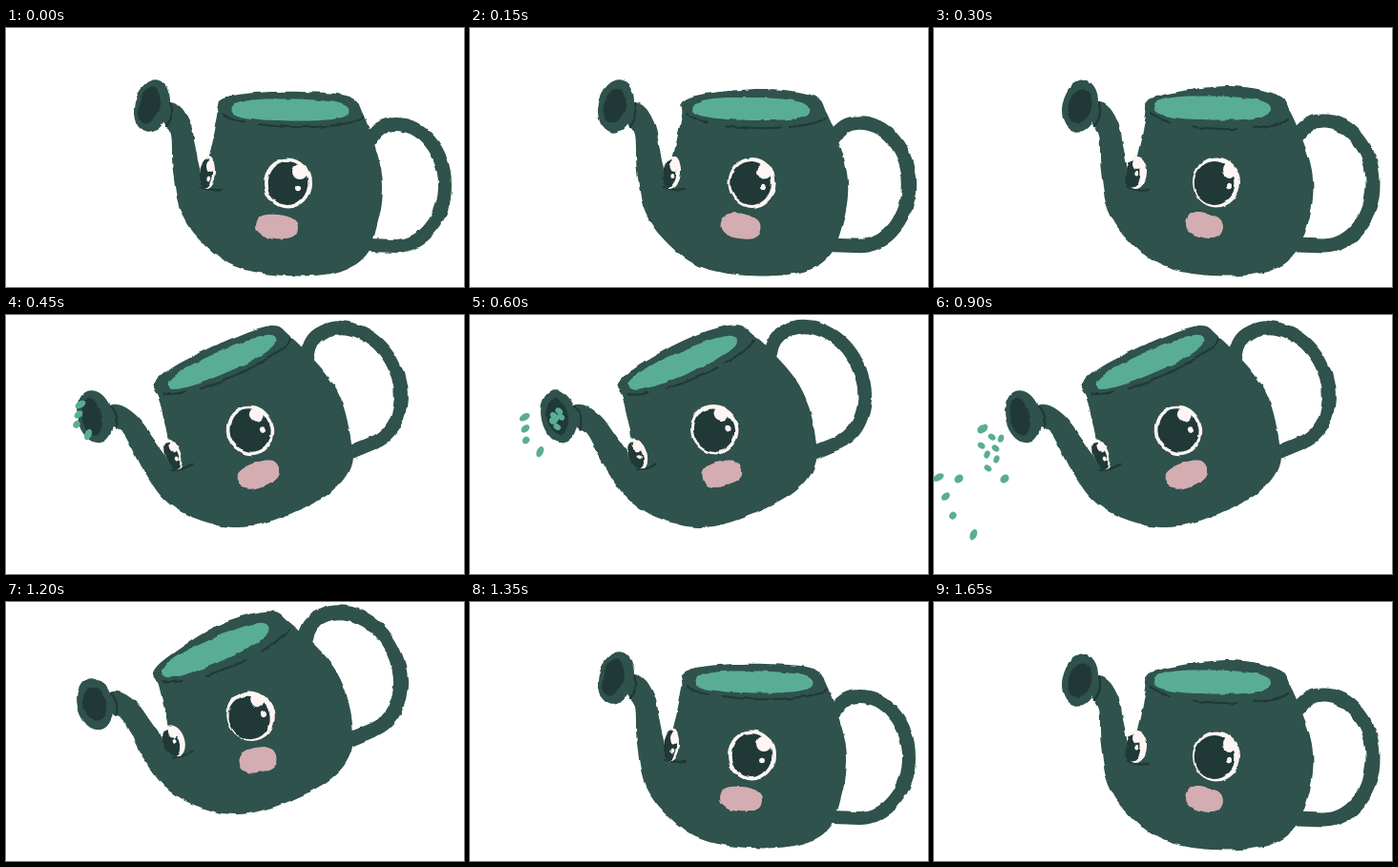
Animation of 480 by 272 pixels, one loop 1.8 s. Source, as an HTML page:

```html
<!DOCTYPE html>
<html lang="en">
<head>
<meta charset="utf-8">
<title>Watering can</title>
<style>
html, body { margin: 0; width: 100%; height: 100%; overflow: hidden; background: #fff; }
svg { display: block; width: 100%; height: 100%; }
</style>
</head>
<body>
<svg viewBox="0 0 480 272">
  <filter id="rough" filterUnits="userSpaceOnUse" x="0" y="0" width="480" height="272" color-interpolation-filters="sRGB">
    <feTurbulence id="noise" type="fractalNoise" baseFrequency="0.07" numOctaves="2"/>
    <feDisplacementMap in="SourceGraphic" scale="4" xChannelSelector="R" yChannelSelector="G"/>
  </filter>
  <g filter="url(#rough)"><g id="can"></g></g>
  <g id="drops"></g>
</svg>
<script>
const BODY = '#2f524c', DARK = '#203937', MINT = '#59ad95', PINK = '#d3adb2', WHITE = '#fff6f4';
const STEP = 150, STEPS = 12, POUR = 3, BACK = 9;
const can = document.getElementById('can');
const water = document.getElementById('drops');
const noise = document.getElementById('noise');

// Spout, rim, then round the belly back to the spout
const OUTLINE = `172,79 184,84 194,102 198,122 202,143 206,153 213,134 222,92 223,77
  250,69 310,67 360,72 374,90 390,135 395,170 389,207 376,240 345,257 290,260
  240,250 205,224 183,192 175,150 173,112 165,98`.split(/\s+/).map(p => p.split(',').map(Number));

// Smooth closed curve through the points
function curve(p) {
  const at = i => p[(i + p.length) % p.length];
  return 'M' + p[0] + p.map((b, i) => {
    const a = at(i - 1), c = at(i + 1), e = at(i + 2);
    const c1 = b.map((v, k) => v + (c[k] - a[k]) / 6);
    const c2 = c.map((v, k) => v - (e[k] - b[k]) / 6);
    return `C${c1} ${c2} ${c}`;
  }).join('') + 'Z';
}

const fill = (d, color) => `<path d="${d}" fill="${color}"/>`;
const line = (d, color, width) =>
  `<path d="${d}" fill="none" stroke="${color}" stroke-width="${width}" stroke-linecap="round"/>`;
const oval = (x, y, rx, ry, color, tilt = 0) =>
  `<ellipse cx="${x}" cy="${y}" rx="${rx}" ry="${ry}" transform="rotate(${tilt} ${x} ${y})" fill="${color}"/>`;

// Ellipse with squarer corners
function pebble(x, y, rx, ry, color, tilt) {
  const soft = v => Math.sign(v) * Math.abs(v) ** 0.8;
  const p = Array.from({ length: 24 }, (_, i) => {
    const a = i * Math.PI / 12;
    return [x + rx * soft(Math.cos(a)), y + ry * soft(Math.sin(a))];
  });
  return `<g transform="rotate(${tilt} ${x} ${y})">${fill(curve(p), color)}</g>`;
}

// Front edge of the rim between two x positions
function rimLine(from, to, b) {
  const p = [];
  for (let i = 0; i <= 8; i++) {
    const x = from + (to - from) * i / 8;
    const u = (x - 301) / 76;
    p.push([x, 87 + (17 + 2 * b) * Math.sqrt(Math.max(0, 1 - u * u)) + 2 * u]);
  }
  return line('M' + p.join('L'), DARK, 2.2);
}

// b goes from the flat-rimmed drawing (0) to the rounder one (1)
function drawCan(b) {
  const body = OUTLINE.map(([x, y]) => [
    x + (x > 385 ? 2.5 * b : 0),
    y < 95 && x > 220 ? y - 6 * b * Math.exp(-(((x - 310) / 45) ** 2)) : y
  ]);
  const top = 101 - 3 * b;
  const handle = `M382 ${117 - 5 * b}Q391 ${top} 407 ${top}A52 ${(229 - top) / 2} 0 0 1 409 229L380 228`;
  return line(handle, BODY, 14 + b) +
    fill(curve(body), BODY) +
    pebble(298 - 6.5 * b, 86 - 2 * b, 61.5, 11.5 + b, MINT, 1) +
    rimLine(228, 251 - 5 * b, b) +
    rimLine(265 + 6 * b, 335 - 18 * b, b) +
    rimLine(335, 374 - 3 * b, b) +
    oval(153, 82, 18.5, 28, BODY, 12) +
    oval(150 + 3 * b, 81 + b, 10.5 + 1.5 * b, 20 - 2 * b, DARK, 14) +
    line('M173 79q4 13 -5 24', DARK, 2.4) +
    line(`M203 167q10 ${4 + b} 22 3`, DARK, 2.4) +
    oval(211 + b, 152, 8 + 3 * b, 17, WHITE, 5) +
    oval(209.5 - b, 153, 6.5 + 1.5 * b, 15.5 - b, DARK, 5) +
    oval(214, 145 - 2 * b, 4 + b, 6, WHITE) +
    oval(212.3, 158 - 5 * b, 2, 2.5, WHITE) +
    oval(295 + b, 163 - b, 25, 26.5, WHITE) +
    oval(295 - b, 163, 21.3, 23, DARK) +
    oval(308 + b, 151 - b, 8 - b, 8, WHITE) +
    oval(307 + 2 * b, 168 - 2 * b, 3, 3.3, WHITE) +
    pebble(283.5, 209 - 2 * b, 22.5 - 3 * b, 13, PINK, 6 + 8 * b);
}

// k counts the steps since the first drops left the spout
function drawDrops(k) {
  if (k < 0 || k > 3) return '';
  let out = '';
  const far = (k / 2) ** 1.15, fall = (k / 2) ** 1.6;
  for (let i = 0; i < 4; i++) {
    const x = 78 - 2 * i + (i === 3 ? 14 : 0);
    out += oval(x - (46 - 6 * i) * far, 94 + 10.5 * i + (40 + 5 * i) * fall,
      6 - i % 3, 3.5, MINT, -30 - 12 * i);
  }
  if (k === 0) return out;

  for (let i = 0; i < 3; i++) {
    const s = k - 1;
    const x = 57 + 12 * i, y = 118 + 13 * Math.cos(Math.PI * i);
    out += oval(88 + (x - 88) * s, 110 + (y - 110) * s + 10 * s * (s - 1), 5, 4, MINT, -40);
  }
  // Beads on the spout's face, thrown wider as they leave it
  const loose = k === 3 ? 1 : 0;
  for (let i = 0; i < 8; i += k === 1 ? 2 : 1) {
    const a = i * 2.4, r = (3 + i) * (1 + loose);
    out += oval(93 - 33 * loose + 0.75 * r * Math.cos(a), 107 + 33 * loose + 1.2 * r * Math.sin(a),
      4.2, 3, MINT, i % 2 ? -70 : 35);
  }
  return out;
}

function draw(step) {
  const b = step % 3 / 2;
  const pouring = step >= POUR && step < BACK;
  const rise = step >= BACK ? 2 * (1 - b) : 0;
  can.setAttribute('transform', pouring
    ? 'translate(-39 -42) rotate(-24.7 295 163)'
    : `translate(0 ${-rise})`);
  noise.setAttribute('seed', 1 + step % 3);
  can.innerHTML = drawCan(b);
  water.innerHTML = drawDrops(step - POUR);
}

let shown = -1;
const start = performance.now();
function tick(now) {
  const step = Math.floor(Math.max(0, now - start) / STEP) % STEPS;
  if (step !== shown) draw(shown = step);
  requestAnimationFrame(tick);
}
tick(start);
</script>
</body>
</html>
```
